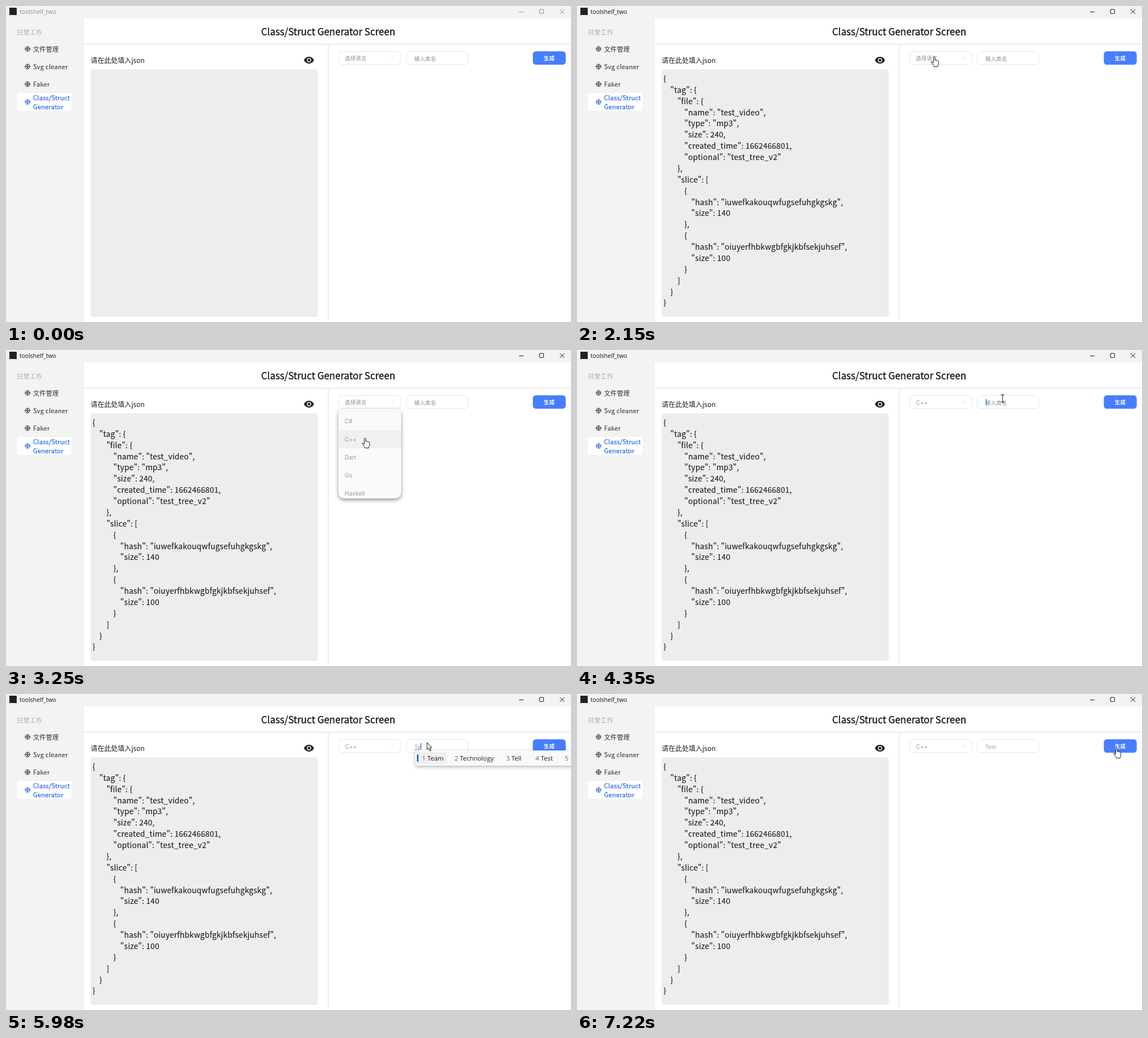
An HTML page that plays this animation: 1001 by 560 pixels, repeating every 7990 ms.

```html
<!DOCTYPE html>
<html lang="zh-CN">
<head>
<meta charset="utf-8">
<title>Class/Struct Generator Screen</title>
<style>
  html, body { margin: 0; height: 100%; overflow: hidden; background: #fff; }
  svg { display: block; width: 1001px; height: 560px; }
  text { font-family: "Noto Sans CJK SC", "Noto Sans", sans-serif; white-space: pre; }
  .ui { font-family: "Open Sans", "Noto Sans", sans-serif; }
  .title { font-size: 17.05px; text-anchor: middle; fill: #111; stroke: #111; stroke-width: .3px; }
  .nav { font-size: 11.15px; letter-spacing: .2px; fill: #3c3f45; stroke: #3c3f45; stroke-width: .12px; }
  .nav.head { fill: #b1b4bd; stroke: #b1b4bd; }
  .nav.on { fill: #336be6; stroke: #336be6; stroke-width: .25px; }
  .small { font-size: 9.43px; letter-spacing: .2px; fill: #8c8c8c; }
  .lang { font: 10.1px Inter, sans-serif; letter-spacing: .15px; fill: #979797; }
  .json { font-size: 13.72px; letter-spacing: .2px; fill: #1c1c1e; stroke: #1c1c1e; stroke-width: .12px; }
  .cand { font-size: 11.45px; fill: #1b1b1b; }
  .field { fill: #fff; stroke: #e5e5e5; }
  #menu { filter: drop-shadow(0 3px 3.5px rgba(0, 0, 0, .42)); }
  #popup { filter: drop-shadow(0 2px 3px rgba(0, 0, 0, .3)); }
</style>
</head>
<body>
<svg viewBox="0 0 1001 560">
  <defs>
    <path id="snow" d="M22 11h-4.17l3.24-3.24-1.41-1.42L15 11h-2V9l4.66-4.66-1.42-1.41L13 6.17V2h-2v4.17L7.76 2.93 6.34 4.34 11 9v2H9L4.34 6.34 2.93 7.76 6.17 11H2v2h4.17l-3.24 3.24 1.41 1.42L9 13h2v2l-4.66 4.66 1.42 1.41L11 17.83V22h2v-4.17l3.24 3.24 1.42-1.41L13 15v-2h2l4.66 4.66 1.41-1.42L17.83 13H22z"/>
    <clipPath id="menuClip"><rect x="589" y="104" width="111" height="159" rx="10"/></clipPath>
  </defs>

  <!-- window frame -->
  <rect width="1001" height="22" fill="#f3f3f3"/>
  <rect y="22" width="138" height="538" fill="#f3f3f3"/>
  <rect x="6" y="3" width="13" height="13" fill="#222"/>
  <g id="chrome" fill="none" stroke="currentColor">
    <text class="ui" x="24" y="13.6" font-size="10.4" fill="currentColor" stroke="none">toolshelf_two</text>
    <path d="M909 10.3h8M981.3 6l8 8M989.3 6l-8 8"/>
    <rect x="945.2" y="6" width="7.3" height="7.3" rx=".8"/>
  </g>

  <!-- sidebar -->
  <rect x="19" y="154" width="97" height="32" rx="4" fill="#fff"/>
  <text class="nav head" x="19" y="50.8">日常工作</text>
  <text class="nav" x="48" y="80.8">文件管理</text>
  <text class="nav" x="48" y="112">Svg cleaner</text>
  <text class="nav" x="48" y="143">Faker</text>
  <text class="nav on" x="48" y="167">Class/Struct</text>
  <text class="nav on" x="48" y="183">Generator</text>
  <g id="icons"></g>

  <!-- header and panes -->
  <text class="title" x="570.8" y="51.6">Class/Struct Generator Screen</text>
  <rect x="138" y="67" width="863" height="1.5" fill="#e8e8e8"/>
  <rect x="570.4" y="68" width="1.1" height="492" fill="#e3e3e3"/>
  <text x="150" y="101.1" font-size="12" fill="#1c1c1e">请在此处填入json</text>
  <path transform="translate(527.2 86.4) scale(.8)" fill="#1c1c1e" d="M12 4.5C7 4.5 2.73 7.61 1 12c1.73 4.39 6 7.5 11 7.5s9.27-3.11 11-7.5c-1.73-4.39-6-7.5-11-7.5zM12 17c-2.76 0-5-2.24-5-5s2.24-5 5-5 5 2.24 5 5-2.24 5-5 5zm0-8c-1.66 0-3 1.34-3 3s1.34 3 3 3 3-1.34 3-3-1.34-3-3-3z"/>
  <rect x="150" y="112" width="402.5" height="439" rx="4" fill="#ededed"/>
  <g id="json"></g>

  <!-- toolbar -->
  <rect class="field" x="589.3" y="80.5" width="110.3" height="23.3" rx="7"/>
  <rect class="field" x="708.5" y="80.5" width="110.3" height="23.3" rx="7"/>
  <path d="M682 91.7l2 1.4 2-1.4" fill="none" stroke="#ccc"/>
  <text class="small" id="pick" x="600.3" y="96.1">选择语言</text>
  <text class="lang" id="chosen" x="600.5" y="96.6">C++</text>
  <text class="small" id="hint" x="723.6" y="96.7">输入类名</text>
  <text class="ui" id="typed" x="723.8" y="96.8" font-size="9.8" fill="#8f8f8f"></text>
  <rect id="underline" x="724" y="98" height="1" fill="#8f8f8f"/>
  <rect x="933.4" y="80.2" width="58.3" height="23.8" rx="5.5" fill="#467eff"/>
  <text x="952.8" y="95.9" font-size="9.6" font-weight="700" fill="#fff">生成</text>

  <g id="menu">
    <rect x="589" y="104" width="111" height="159" rx="10" fill="#fafafa"/>
    <g id="items" clip-path="url(#menuClip)">
      <rect id="hover" x="589" y="142" width="111" height="32" fill="#f0f0f0"/>
    </g>
  </g>

  <rect id="caret" fill="#2b8ff0"/>

  <g id="popup">
    <rect id="popupBox" x="725" y="100" height="27" rx="4" fill="#f9f9f9"/>
    <rect id="firstBox" x="728" y="103" height="21" rx="3" fill="#efefef"/>
    <rect x="728" y="107" width="2.6" height="13" rx="1.3" fill="#0067c0"/>
    <g id="cands"></g>
  </g>

  <g id="cursor" stroke-linejoin="round">
    <path id="beam" d="M-3-6.5h2.3l.7.7.7-.7H3M0-5.8V5.8M-3 6.5h2.3l.7-.7.7.7H3" fill="none" stroke="#222" stroke-width="1.1"/>
    <path id="arrow" d="M0 0v12.5l2.8-2.6 2.1 4.9 2.1-.9-2.1-4.8H8.6z" fill="#fff" stroke="#111"/>
    <path id="hand" d="M-1.6 11V1.6C-1.6-.3 1.1-.3 1.1 1.6V6.2c.3-1 2.2-.8 2.3.4.5-.8 2.1-.5 2.2.6.7-.6 2-.1 2 1.2v4.1c0 1.7-1 2.6-1.4 3.7v1.5H-.6v-1.4C-1.9 14.6-3.7 12.6-5 10.2c-.7-1.5 1-2.2 1.9-1z" fill="#fff" stroke="#111"/>
  </g>
</svg>
<script>
const LOOP = 7990;
const $ = id => document.getElementById(id);
const show = (id, on) => { $(id).style.display = on ? '' : 'none'; };
const set = (id, attrs) => { for (const k in attrs) $(id).setAttribute(k, attrs[k]); };
const ramp = (t, a, b) => Math.min(1, Math.max(0, (t - a) / (b - a)));
const last = (list, t) => list.filter(row => row[0] <= t).pop();
const label = (cls, x, y, body) => `<text class="${cls}" x="${x}" y="${y}">${body}</text>`;

const data = { tag: {
  file: { name: 'test_video', type: 'mp3', size: 240, created_time: 1662466801, optional: 'test_tree_v2' },
  slice: [
    { hash: 'iuwefkakouqwfugsefuhgkgskg', size: 140 },
    { hash: 'oiuyerfhbkwgbfgkjkbfsekjuhsef', size: 100 }
  ]
} };
$('json').innerHTML = JSON.stringify(data, null, 2).split('\n').map((line, i) => {
  const level = line.search(/\S/) / 2;
  return label('json', 153.2 + 12.35 * level, 134 + 19.87 * i, line.trim());
}).join('');

$('icons').innerHTML = [76, 107.3, 138.4, 170].map((y, i) =>
  `<use href="#snow" fill="${i < 3 ? '#3c3f45' : '#336be6'}" transform="translate(${38.2 - 6.4} ${y - 6.4}) scale(.535)"/>`).join('');

$('items').innerHTML += ['C#', 'C++', 'Dart', 'Go', 'Haskell']
  .map((name, i) => label('lang', 600, 130.4 + 31.85 * i, name)).join('');

// time, x, y
const path = [
  [350, 340, 492], [740, 287, 178], [1600, 287, 178], [1760, 470, 130], [1920, 688, 94],
  [2080, 640, 90], [2150, 633, 90], [3010, 633, 90], [3250, 636.5, 156], [3480, 636.5, 156],
  [3560, 637, 158], [3790, 637, 158], [4110, 754, 86], [5660, 754, 86], [5740, 746, 86],
  [6700, 746, 86], [6860, 800, 150], [6950, 850, 171], [7140, 956, 96], [LOOP, 956, 96]
];
const shapes = [[0, 'beam'], [1800, 'arrow'], [1860, 'hand'], [3900, 'arrow'], [4040, 'beam'],
  [5660, 'arrow'], [7050, 'hand']];
const typing = [[0, ''], [5660, 'T'], [5980, 'Te'], [6210, 'Tes'], [6370, 'Test']];

// time, popup width, candidates as x and word
const lists = [
  [5740, 131, [[737, 'To'], [784, 'The']]],
  [5980, 290, [[737, 'Team'], [794.5, 'Technology'], [886, 'Tell'], [938, 'Test'], [990, '']]],
  [6210, 290, [[737, 'Test'], [783, 'Tests'], [835, 'Testing'], [902, 'Tested'], [966, 'Tes']]]
];
let shownList;

function drawPopup(t) {
  const list = t < 6690 && last(lists, t);
  show('popup', list);
  if (!list || list === shownList) return;
  shownList = list;
  $('cands').innerHTML = list[2].map(([x, word], i) =>
    label('ui cand', x, 117.6, `<tspan fill="#666">${i + 1}</tspan> ${word}`)).join('');
  set('popupBox', { width: list[1] });
  set('firstBox', { width: $('cands').firstChild.getComputedTextLength() + 15 });
}

function drawCaret(t, textWidth) {
  const carets = [
    [900, 1430, 154, 123, 18], [1520, 2050, 159.5, 518, 17],
    [4350, 4880, 724, 87, 11], [5350, 7220, 724 + textWidth, 87, 11]
  ];
  const now = carets.find(c => t >= c[0] && t < c[1]);
  show('caret', now);
  if (now) set('caret', { x: now[2], y: now[3], width: 1.7, height: now[4] });
}

function drawCursor(t) {
  show('cursor', t >= 350);
  if (t < 350) return;
  const i = path.findIndex(p => p[0] > t);
  const [a, b] = [path[i - 1], path[i]];
  const k = ramp(t, a[0], b[0]);
  const x = a[1] + (b[1] - a[1]) * k, y = a[2] + (b[2] - a[2]) * k;
  set('cursor', { transform: `translate(${x} ${y})` });
  const shape = last(shapes, t)[1];
  for (const id of ['beam', 'arrow', 'hand']) show(id, id === shape);
}

function draw(t) {
  $('chrome').style.color = t < 740 ? '#8c8c8c' : '#111';
  show('json', t >= 1520);

  const open = ramp(t, 2580, 2780) * (1 - ramp(t, 3790, 3950));
  show('menu', open > 0);
  $('menu').style.opacity = open;
  $('hover').style.opacity = ramp(t, 3150, 3250);
  show('pick', t < 3790);
  show('chosen', t >= 3790);

  const word = last(typing, t)[1];
  $('typed').textContent = word;
  show('hint', !word);
  const width = word ? $('typed').getComputedTextLength() : 0;
  show('underline', word && t < 6690);
  set('underline', { width });

  drawPopup(t);
  drawCaret(t, width);
  drawCursor(t);
}

const start = performance.now();
function tick() {
  draw((performance.now() - start) % LOOP);
  requestAnimationFrame(tick);
}
tick();
</script>
</body>
</html>
```
